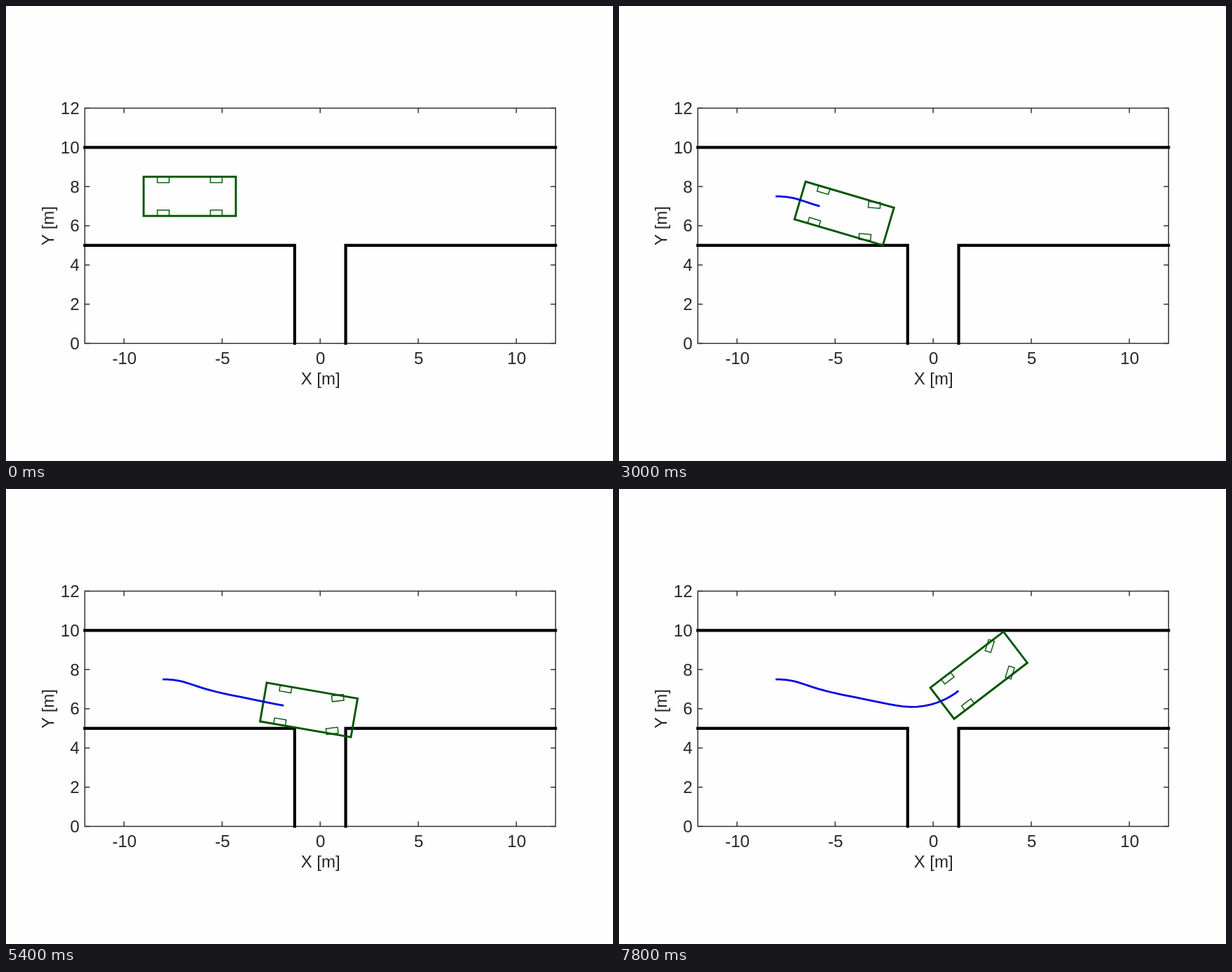
These frames come from a looping animation (864 px wide and 648 px high, 8000 ms). An HTML page with a canvas:

```html
<!DOCTYPE html>
<html lang="en">
<head>
<meta charset="utf-8">
<title>Car manoeuvre</title>
<style>
  html, body { margin: 0; width: 100%; height: 100%; overflow: hidden; background: #fefefe; }
  canvas { display: block; width: 864px; height: 648px; }
</style>
</head>
<body>
<canvas id="stage" width="864" height="648"></canvas>
<script>
const ctx = document.getElementById('stage').getContext('2d');
const STEP = 200, STEPS = 40;
const SCALE = 27.92, X0 = 447.2, Y0 = 480.5;
const WHEELBASE = 2.7, STEER_RATE = 12, RAD = Math.PI / 180;
const INK = '#262626', GREEN = '#005505', BLUE = '#0505e6';

const px = x => X0 + x * SCALE;
const py = y => Y0 - y * SCALE;

// From each step on, the front wheels turn towards this angle in degrees
const turns = [[0, -35], [9.8, 12], [18.2, 0], [25.6, 35]];

const wantedSteer = k => turns.findLast(([from]) => k >= from)[1];

// Metres per step: ease up to cruising speed, then brake evenly
function speedAt(k) {
  const rise = Math.min(1, (k + 0.2) / 28);
  return Math.min(0.367 * Math.sin(rise * Math.PI / 2), 0.034 * (41.9 - k));
}

// Bicycle model, driven by the rear axle
function drive() {
  const sub = 50, dt = 1 / sub, path = [];
  let x = -8, y = 7.5, heading = 0, steer = 0;
  for (let i = 0; i < STEPS * sub; i++) {
    if (i % sub === 0) path.push({ x, y, heading, steer });
    const k = (i + 0.5) * dt, ds = speedAt(k) * dt, turn = STEER_RATE * dt;
    steer += Math.max(-turn, Math.min(turn, wantedSteer(k) - steer));
    const bend = ds * Math.tan(steer * RAD) / WHEELBASE;
    x += ds * Math.cos(heading + bend / 2);
    y += ds * Math.sin(heading + bend / 2);
    heading += bend;
  }
  return path;
}
const path = drive();

function line(points, width, color, cap = 'butt') {
  ctx.beginPath();
  points.forEach(([x, y]) => ctx.lineTo(x, y));
  ctx.lineWidth = width;
  ctx.strokeStyle = color;
  ctx.lineCap = cap;
  ctx.stroke();
}

function label(text, x, y, align = 'center') {
  ctx.textAlign = align;
  ctx.fillText(text, x, y);
}

function drawAxes() {
  const left = px(-12), right = px(12), top = py(12), bottom = py(0), tick = 7;
  ctx.strokeStyle = INK;
  ctx.lineWidth = 1.4;
  ctx.strokeRect(left, top, right - left, bottom - top);
  ctx.fillStyle = INK;
  ctx.font = '24px "Liberation Sans", Arial, sans-serif';
  for (let v = -10; v <= 10; v += 5) {
    const x = px(v);
    line([[x, bottom], [x, bottom - tick]], 1.4, INK);
    line([[x, top], [x, top + tick]], 1.4, INK);
    label(v, x + 0.5, 510.3);
  }
  for (let v = 0; v <= 12; v += 2) {
    const y = py(v);
    line([[left, y], [left + tick, y]], 1.4, INK);
    line([[right, y], [right - tick, y]], 1.4, INK);
    label(v, 104.5, y + 8.5, 'right');
  }
  label('X [m]', X0 + 0.5, 539);
  ctx.save();
  ctx.translate(68, 313);
  ctx.rotate(-Math.PI / 2);
  label('Y [m]', 0, 0);
  ctx.restore();
}

function drawRoad() {
  const road = pts => line(pts.map(([x, y]) => [px(x), py(y)]), 4.2, '#000', 'square');
  road([[-12, 10], [12, 10]]);
  for (const side of [-1, 1]) road([[12 * side, 5], [1.3 * side, 5], [1.3 * side, 0]]);
}

function box(x, y, w, h, width) {
  ctx.lineWidth = width;
  ctx.strokeRect(x * SCALE, y * SCALE, w * SCALE, h * SCALE);
}

function drawCar({ x, y, heading, steer }) {
  ctx.save();
  ctx.translate(px(x), py(y));
  ctx.rotate(-heading);
  ctx.strokeStyle = GREEN;
  box(-1, -1, 4.7, 2, 2.9);
  for (const axle of [0, WHEELBASE]) {
    for (const side of [-0.85, 0.85]) {
      ctx.save();
      ctx.translate(axle * SCALE, side * SCALE);
      if (axle) ctx.rotate(-steer * RAD);
      box(-0.3, -0.15, 0.6, 0.3, 1.4);
      ctx.restore();
    }
  }
  ctx.restore();
}

function drawTrail(k) {
  const points = path.slice(1, k + 1).map(p => [px(p.x), py(p.y)]);
  line(points, 2.8, BLUE, 'square');
}

function draw(now) {
  const k = Math.floor(now / STEP) % STEPS;
  ctx.fillStyle = '#fefefe';
  ctx.fillRect(0, 0, 864, 648);
  drawAxes();
  drawRoad();
  drawCar(path[k]);
  drawTrail(k);
}

let start;
function tick(now) {
  start ??= now;
  draw(now - start);
  requestAnimationFrame(tick);
}
draw(0);
requestAnimationFrame(tick);
</script>
</body>
</html>
```
